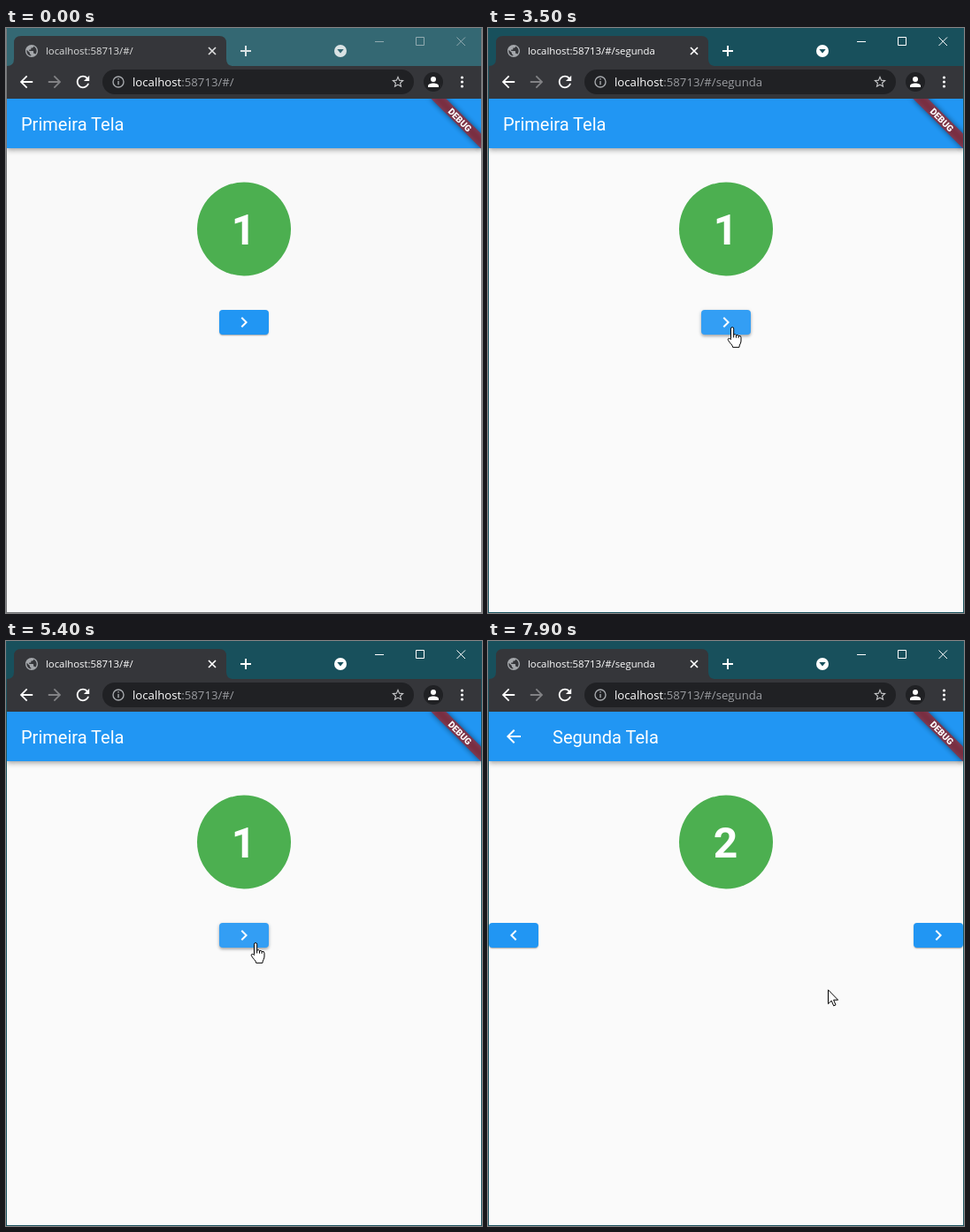
An HTML page that plays this animation: 538 by 662 pixels, repeating every 8000 ms.

```html
<!DOCTYPE html>
<html lang="pt">
<head>
<meta charset="utf-8">
<title>Telas</title>
<style>
html, body { margin: 0; width: 100%; height: 100%; overflow: hidden; background: #fafafa; }
#stage { position: absolute; left: 0; top: 0; width: 538px; height: 662px; overflow: hidden;
  --bar: #18505c; --tab: #fff; --glyph: #fff; --edge: #1c5460; }
#stage.idle { --bar: #346873; --tab: #dcdddd; --glyph: #d9e2e4; --win: #91aab0; --edge: #77797b; }
#stage > svg, .page svg { position: absolute; left: 0; top: 0; }
#view { position: absolute; left: 1px; top: 80px; width: 536px; height: 581px; overflow: hidden; background: #fafafa; }
.page { position: absolute; inset: 0; background: #fafafa; }
#stage.idle .page { background: #f9f9f9; }
.bar { position: absolute; left: 0; top: 0; width: 536px; height: 56px; background: #2196f3;
  box-shadow: 0 2px 4px -1px rgba(0,0,0,.2), 0 4px 5px rgba(0,0,0,.12), 0 1px 8px rgba(0,0,0,.1); }
.btn { position: absolute; top: 239px; width: 56px; height: 28px; border-radius: 4px; background: #2196f3;
  box-shadow: 0 2px 1px -1px rgba(0,0,0,.16), 0 1px 2px rgba(0,0,0,.2); }
.btn.hover { background: #339ef4; box-shadow: 0 2px 3px rgba(0,0,0,.24), 0 1px 5px rgba(0,0,0,.14); }
.ui { font-family: "Open Sans", "Noto Sans", sans-serif; }
.app { font-family: Roboto, sans-serif; fill: #fff; }
#edge { position: absolute; inset: 0; box-sizing: border-box; border: 1px solid var(--edge); border-top-color: var(--bar); }
</style>
</head>
<body>
<div id="stage">
  <svg width="538" height="80" class="ui">
    <rect width="538" height="80" style="fill:var(--bar)"/>
    <path d="M0 80V43H1Q9 43 9 35V17Q9 9 17 9H241Q249 9 249 17V35Q249 43 257 43H538V80Z" fill="#35363a"/>
    <path transform="translate(20.6 17.6) scale(.7)" fill="#a3a6aa" d="M12 2C6.48 2 2 6.48 2 12s4.48 10 10 10 10-4.48 10-10S17.52 2 12 2zm-1 17.93c-3.95-.49-7-3.85-7-7.93 0-.62.08-1.21.21-1.79L9 15v1c0 1.1.9 2 2 2v1.93zm6.9-2.54c-.26-.81-1-1.39-1.9-1.39h-1v-3c0-.55-.45-1-1-1H8v-2h2c.55 0 1-.45 1-1V7h2c1.1 0 2-.9 2-2v-.41c2.93 1.19 5 4.06 5 7.41 0 2.08-.8 3.97-2.1 5.39z"/>
    <text id="tab" x="45" y="30" font-size="11.35" style="fill:var(--tab)"></text>
    <path d="M229 22l8 8m0-8l-8 8" fill="none" stroke-width="1.7" style="stroke:var(--tab)"/>
    <path d="M265 26h12m-6-6v12" fill="none" stroke-width="2" style="stroke:var(--glyph)"/>
    <circle cx="378" cy="26" r="7" style="fill:var(--glyph)"/>
    <path d="M374.3 24h7.4l-3.7 4.6z" style="fill:var(--bar)"/>
    <path d="M417 15.5h10M463.5 10.5h9v9h-9zM509.5 10.5l9.5 9.5m0-9.5l-9.5 9.5" fill="none" stroke-width="1" style="stroke:var(--win, #fff)"/>

    <path id="back" transform="translate(12.2 50.2) scale(.9)" fill="#fff" d="M20 11H7.83l5.59-5.59L12 4l-8 8 8 8 1.41-1.41L7.83 13H20v-2z"/>
    <use href="#back" transform="matrix(-1 0 0 1 78 0)" opacity=".38"/>
    <path transform="translate(76.2 50.2) scale(.9)" fill="#fff" d="M17.65 6.35C16.2 4.9 14.21 4 12 4c-4.42 0-7.99 3.58-7.99 8s3.57 8 7.99 8c3.73 0 6.84-2.55 7.73-6h-2.08c-.82 2.33-3.04 4-5.65 4-3.31 0-6-2.69-6-6s2.69-6 6-6c1.66 0 3.14.69 4.22 1.78L13 11h7V4l-2.35 2.35z"/>
    <rect x="109" y="47" width="352" height="28" rx="14" fill="#202124"/>
    <g stroke="#a5a8ac" stroke-width="1.4" fill="none">
      <circle cx="127" cy="61" r="6"/>
      <path d="M127 60v4.3m0-7.4v1.5"/>
    </g>
    <text x="143" y="66" font-size="13.2" fill="#fff">localhost<tspan id="path" fill="#9a9ca0"></tspan></text>
    <path transform="translate(434.6 52.6) scale(.7)" fill="#c8c9cb" d="M22 9.24l-7.19-.62L12 2 9.19 8.63 2 9.24l5.46 4.73L5.82 21 12 17.27 18.18 21l-1.63-7.03L22 9.24zM12 15.4l-3.76 2.27 1-4.28-3.32-2.88 4.38-.38L12 6.1l1.71 4.04 4.38.38-3.32 2.88 1 4.28L12 15.4z"/>
    <circle cx="483" cy="61" r="11" fill="#202124"/>
    <path d="M477 67v-1.6c0-4 12-4 12 0V67z" fill="#fff"/>
    <circle cx="483" cy="58" r="3" fill="#fff"/>
    <g fill="#fff"><circle cx="515.5" cy="56" r="1.6"/><circle cx="515.5" cy="61" r="1.6"/><circle cx="515.5" cy="66" r="1.6"/></g>
  </svg>

  <div id="view">
    <div class="page" id="one"></div>
    <div class="page" id="two"></div>
  </div>

  <svg width="538" height="662">
    <defs>
      <clipPath id="clip"><rect x="1" y="80" width="536" height="581"/></clipPath>
      <filter id="blur" x="-50%" y="-150%" width="200%" height="400%"><feGaussianBlur stdDeviation="3"/></filter>
    </defs>
    <g clip-path="url(#clip)">
      <g transform="translate(537 80) rotate(45)">
        <rect x="-40" y="28" width="80" height="12" opacity=".5" filter="url(#blur)"/>
        <rect x="-40" y="28" width="80" height="12" fill="#b71c1c" fill-opacity=".627"/>
        <text class="app" x="0" y="37.6" font-size="10.2" font-weight="900" text-anchor="middle">DEBUG</text>
      </g>
    </g>
  </svg>
  <div id="edge"></div>
  <svg width="538" height="662">
    <g id="cursor" fill="#fff" stroke="#000" stroke-linejoin="round">
      <path id="arrow" d="M.5 .8V16.6L4.2 13.1 6.7 18.8 9 17.8 6.6 12.2H11.6Z"/>
      <g id="hand" transform="translate(-6.5 0)">
        <path d="M5 13.5V2.2a1.6 1.6 0 0 1 3.2 0V9q1.9-1.1 2.8.6q1.7-.9 2.6.8q2.9-.7 2.9 1.8v3.8c0 3-1.9 4-2.1 7.3H7.2c-.4-3-3.2-4.4-5.2-7.9c-1.1-2 1.4-3.2 3-.9z"/>
        <path d="M8.2 9v3.4M11 9.6v3M13.6 10.4v2.4" fill="none"/>
      </g>
      <path id="resize" d="M-11 .5l5.5-5V-1.5H5.5V-4.5L11 .5 5.5 5.5V2.5H-5.5V5.5Z"/>
    </g>
  </svg>
</div>
<script>
const $ = id => document.getElementById(id);
const LOOP = 8000, STEP = 100;
const NEXT = "M10 6L8.59 7.41 13.17 12l-4.58 4.59L10 18l6-6z";
const PREV = "M15.41 7.41L14 6l-6 6 6 6 1.41-1.41L10.83 12z";

// time, x, y of the pointer tip
const pointer = [
  [500, 75, 18], [600, 190, 84], [700, 278, 130], [800, 316, 145],
  [900, 316, 145], [1000, 330, 145], [1200, 375, 127],
  [1600, 375, 127], [1900, 374, 123], [2400, 374, 123],
  [2500, 374, 119], [2600, 380, 117], [2800, 452, 230], [3000, 372, 362], [3200, 284, 345], [3300, 276, 338],
  [3600, 276, 338], [3800, 222, 356], [4000, 90, 370], [4200, 0, 346], [4400, 28, 333],
  [4800, 28, 333], [5000, 90, 362], [5200, 215, 370], [5400, 282, 341], [5600, 271, 336],
  [5900, 271, 336], [6000, 240, 352], [6200, 112, 372], [6300, 22, 359], [6500, 24, 336],
  [6800, 24, 336], [7000, 41, 380], [7200, 255, 348], [7300, 255, 348],
  [7400, 263, 330], [7500, 263, 330], [7900, 384, 394]
];
// time, progress of the second page
const route = [
  [3700, .32], [3800, .75], [3900, 1], [4700, .75], [4900, .38], [5000, 0],
  [5900, .45], [6000, .75], [6200, 1], [6800, .75], [6900, .32], [7000, 0],
  [7600, .2], [7700, .55], [7800, .9], [7900, 1]
];
const secondUrl = [[3500, 4600], [5800, 6700], [7500, LOOP]];

function buildPage(el, title, titleX, digit, buttons, hasBack) {
  el.innerHTML = '<div class="bar"></div>' +
    buttons.map(b => `<div class="btn" style="left:${b.x - 1}px"></div>`).join("") +
    `<svg width="536" height="581" viewBox="1 80 536 581">
      <text class="app" x="${titleX}" y="116" font-size="20">${title}</text>
      <circle cx="269" cy="227.5" r="53" fill="#4caf50"/>
      <text class="app" x="268.5" y="244.5" font-size="48" font-weight="700" text-anchor="middle">${digit}</text>` +
    buttons.map(b => `<path d="${b.icon}" fill="#fff" transform="translate(${b.x + 16} 321)"/>`).join("") +
    (hasBack ? `<path d="${$("back").getAttribute("d")}" fill="#fff" transform="translate(17 96)"/>` : "") +
    "</svg>";
  const nodes = el.querySelectorAll(".btn");
  return buttons.map((b, i) => ({ x: b.x, el: nodes[i] }));
}
const first = buildPage($("one"), "Primeira Tela", 17, 1, [{ x: 241, icon: NEXT }], false);
const second = buildPage($("two"), "Segunda Tela", 73, 2, [{ x: 1, icon: PREV }, { x: 481, icon: NEXT }], true);

function bezier(x1, y1, x2, y2) {
  const at = (a, b, s) => 3 * a * s * (1 - s) ** 2 + 3 * b * s * s * (1 - s) + s ** 3;
  return x => {
    let lo = 0, hi = 1;
    for (let i = 0; i < 24; i++) {
      const mid = (lo + hi) / 2;
      if (at(x1, x2, mid) < x) lo = mid; else hi = mid;
    }
    return at(y1, y2, hi);
  };
}
const slide = bezier(.4, 0, .2, 1), fade = bezier(.42, 0, 1, 1);

function pointerAt(t) {
  const i = pointer.findIndex(p => p[0] > t);
  if (i < 0) return pointer[pointer.length - 1].slice(1);
  const [t0, x0, y0] = pointer[i - 1], [t1, x1, y1] = pointer[i];
  const k = (t - t0) / (t1 - t0);
  return [Math.round(x0 + (x1 - x0) * k), Math.round(y0 + (y1 - y0) * k)];
}

const show = (id, on) => { $(id).style.display = on ? "" : "none"; };

function draw(t) {
  $("stage").className = t < 3500 ? "idle" : "";

  const tail = ":58713/#/" + (secondUrl.some(([a, b]) => t >= a && t < b) ? "segunda" : "");
  $("tab").textContent = "localhost" + tail;
  $("path").textContent = tail;

  const v = route.reduce((old, [at, value]) => t >= at ? value : old, 0);
  show("two", v > 0);
  $("two").style.opacity = v < 1 ? fade(v) : 1;
  $("two").style.transform = v < 1 ? `translateY(${145.5 * (1 - slide(v))}px)` : "none";

  const visible = t >= 500;
  show("cursor", visible);
  const [x, y] = visible ? pointerAt(t) : [-50, -50];
  const atEdge = x < 1;
  let over = false;
  for (const list of [first, second]) {
    const active = list === (v > 0 ? second : first);
    for (const b of list) {
      const hit = active && !atEdge && x >= b.x && x < b.x + 56 && y >= 319 && y < 347;
      b.el.classList.toggle("hover", hit);
      over = over || hit;
    }
  }
  $("cursor").setAttribute("transform", `translate(${x} ${y})`);
  show("hand", over);
  show("resize", atEdge);
  show("arrow", !over && !atEdge);
}

const start = performance.now();
function tick() {
  const t = (performance.now() - start) % LOOP;
  draw(Math.floor(t / STEP) * STEP);
  requestAnimationFrame(tick);
}
tick();
</script>
</body>
</html>
```
